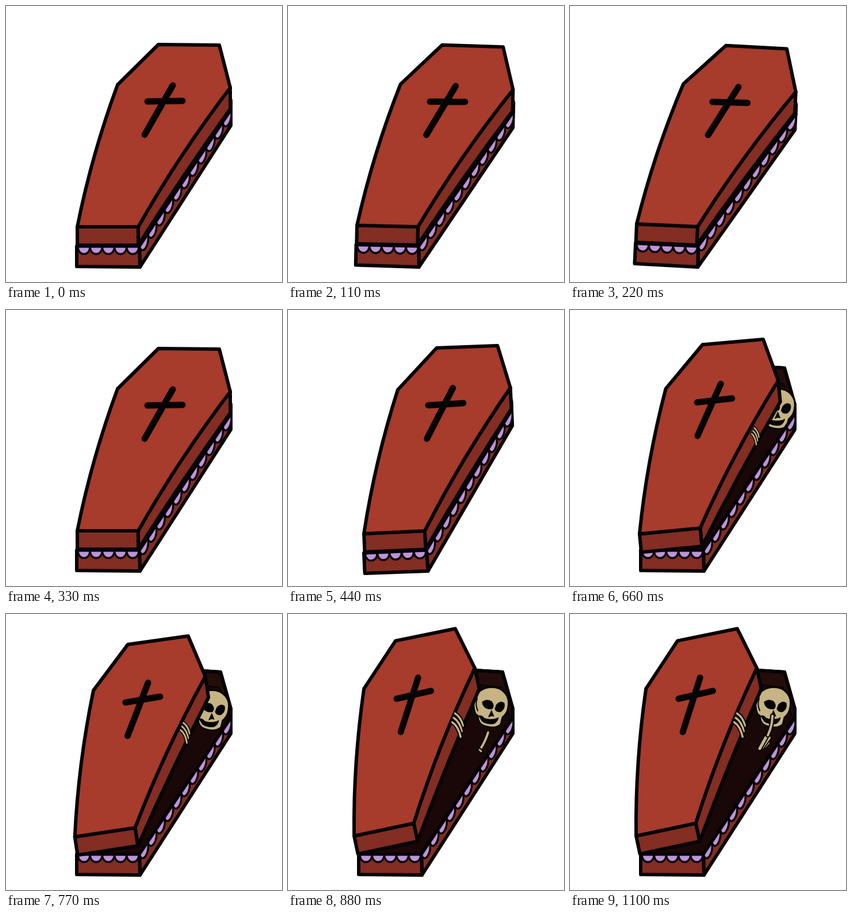
Animation, 480 px wide and 480 px high, one loop 1430 ms. Source, as an HTML page with a canvas:

```html
<!DOCTYPE html>
<html lang="en">
<head>
<meta charset="utf-8">
<title>Coffin</title>
<style>
html, body { margin: 0; height: 100%; overflow: hidden; background: #fff; }
canvas { display: block; width: 100vw; height: 100vh; }
</style>
</head>
<body>
<canvas id="stage" width="480" height="480"></canvas>
<script>
const ctx = document.getElementById('stage').getContext('2d');
const INK = '#050303', BONE = '#c6b484', LILAC = '#bf93dc', TOP = '#a73b2c', SIDE = '#832d23';
const STEP = 110, LAST = 10, LOOP = 1430;
const OPENING = 5, PEEK = 6, ARM = 8, HUSH = 9;
// The closed coffin rocks left, then right
const SWAY = [0, -.5, -1, 0, 1];

function shape(d, fill, width = 6) {
  const path = new Path2D(d);
  ctx.fillStyle = fill;
  ctx.fill(path);
  if (width) line(path, INK, width);
}

function line(d, color, width) {
  ctx.strokeStyle = color;
  ctx.lineWidth = width;
  ctx.stroke(new Path2D(d));
}

function bone(d, width = 4) {
  line(d, INK, width + 4);
  line(d, BONE, width);
}

// Draws in a frame moved to x, y and turned counterclockwise by some degrees
function place(x, y, turn, draw) {
  ctx.save();
  ctx.translate(x, y);
  ctx.rotate(-turn * Math.PI / 180);
  draw();
  ctx.restore();
}

function scallops(x, y, dx, dy, count, bulgeX, bulgeY) {
  for (let i = 0; i < count; i++) {
    const px = x + dx * i, py = y + dy * i;
    shape(`M${px} ${py}c${bulgeX} ${bulgeY} ${dx + bulgeX} ${dy + bulgeY} ${dx} ${dy}Z`, LILAC, 3.5);
  }
}

function drawInside() {
  shape('M0 0H109L268-237V-253L250-317L202-320Z', '#190807');
  shape('M202-320L250-317L268-253V-237L262-241L248-290L203-296Z', '#220d0b', 2);
  line('M202-320L250-317L268-253V-237', INK, 6);
}

function drawBox() {
  shape('M109 0L268-237V-210L110 36Z', SIDE);
  shape('M0 0H109L110 36L0 35Z', SIDE);
  scallops(2, 0, 21.2, 0, 5, 0, 18);
  scallops(109, 0, 159 / 11, -237 / 11, 11, 5, 18);
  line('M0 0H109L268-237M109 0L110 36', INK, 5);
}

function drawLid() {
  shape('M266-242Q176-124 106 0V32Q182-88 266-205Z', SIDE);
  shape('M0 0H106V32H0Z', SIDE);
  shape('M141-317L247-316L266-242Q176-124 106 0H0Q25-125 70-247Z', TOP);
  line('M166-246L117-160M122-218L183-219', INK, 11);
}

function drawGrip(size) {
  place(218, -146, 0, () => {
    ctx.scale(size, size);
    for (let i = 0; i < 3; i++) bone(`M${-2 - 4 * i} ${-26 + 7 * i}q9 9 9 ${24 + 2 * i}`, 3.5);
  });
}

function drawSkull() {
  shape('M326 174C317 150 329 128 354 127C375 127 387 144 383 162' +
    'C382 171 378 176 373 180L370 192Q361 200 346 196Q334 194 331 184L330 177Z', BONE, 3);
  shape('M338 153Q345 147 354 152Q360 159 355 165Q347 166 343 163Q338 159 338 153Z' +
    'M363 157Q370 150 376 155Q378 165 370 170Q361 171 360 165Z' +
    'M354 168L358 178L354 177L349 179Z', INK, 1);
  shape('M332 177Q338 176 341 181Q350 185 362 182L366 180Q364 189 357 191Q345 192 338 187Z', INK, 1);
  line('M329 147Q325 157 330 168', INK, 2);
}

function drawForearm() {
  bone('M348 206Q344 220 334 236');
  bone('M333 236L336 239', 3);
}

function drawHush() {
  bone('M345 224L339 231');
  bone('M347 215L335 232');
  bone('M341 214L330 234', 5);
  bone('M352 177Q352 194 344 211');
}

function draw(step) {
  const sway = SWAY[step] || 0, opening = step >= OPENING;
  const open = opening ? Math.min(1, (step - OPENING) / 3) ** 1.25 : 0;
  const box = [123 + 9 * sway, 418 + 5 * sway, 2.6 * sway];
  const lid = opening
    ? [121 - 6 * open ** 3, 393 - 7 * Math.sqrt(open), 3.4 + 8.6 * open]
    : [124 + 8 * sway, 384 + 5 * sway, 2.6 * sway];

  ctx.fillStyle = '#fff';
  ctx.fillRect(0, 0, 480, 480);
  place(...box, drawInside);
  if (step >= PEEK) place(10 * (1 - open), 13 * (1 - open), 0, drawSkull);
  if (step === ARM) drawForearm();
  // The finger rises to the lips in the last step
  if (step >= HUSH) place(0, 13 * (LAST - step), 0, drawHush);
  place(...box, drawBox);
  place(...lid, () => {
    drawLid();
    if (opening) drawGrip(.6 + .4 * open);
  });
}

ctx.lineJoin = ctx.lineCap = 'round';
const start = performance.now();

function tick() {
  const time = (performance.now() - start) % LOOP;
  draw(Math.min(Math.floor(time / STEP), LAST));
  requestAnimationFrame(tick);
}
tick();
</script>
</body>
</html>
```
